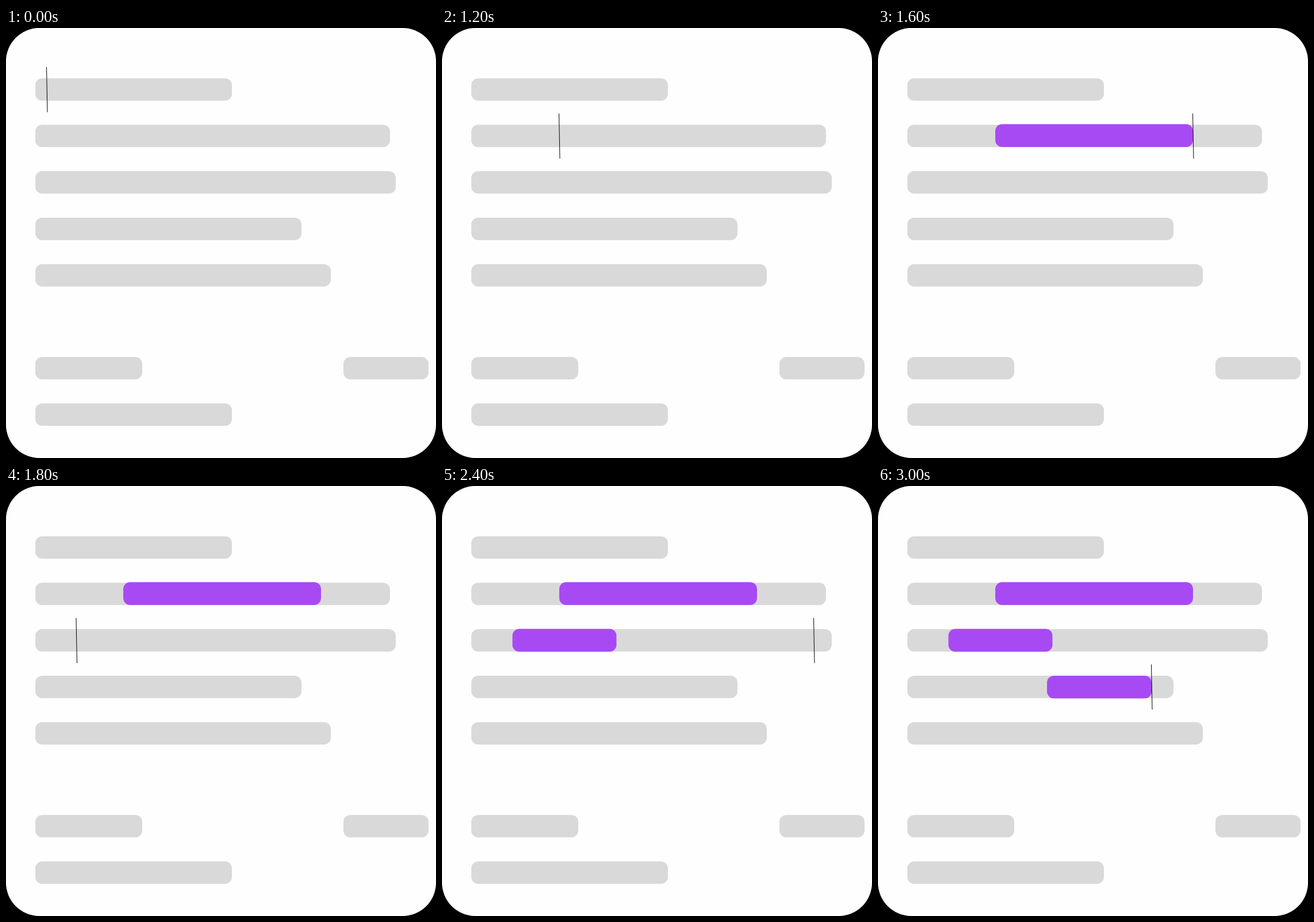
An HTML page with a canvas for the animation above (3200 ms loop, 748 by 748 pixels).

```html
<!DOCTYPE html>
<html lang="en">
<head>
<meta charset="utf-8">
<title>Text selection</title>
<style>
  html, body { margin: 0; width: 100%; height: 100%; overflow: hidden; background: #000; }
  canvas { display: block; }
</style>
</head>
<body>
<canvas id="stage" width="748" height="748"></canvas>
<script>
const ctx = document.getElementById('stage').getContext('2d');
const SIZE = 748, STEP = 200, LEFT = 51, PITCH = 80.8;
const PAPER = '#fefefe', GREY = '#d9d9d9', PURPLE = '#a84af3', INK = '#000';

// Each row: right end of the line, caret stops, and the stops a selection spans
const rows = [
  { right: 393, stops: [70, 120, 170, 237, 338] },
  { right: 668, stops: [98, 203, 380, 547], span: [1, 3] },
  { right: 678, stops: [121.5, 302.5, 424, 646], span: [0, 1] },
  { right: 514, stops: [172, 293, 475], span: [1, 2] },
  { right: 565 },
  {},
  { right: 237 },
  { right: 393 }
];

const total = rows.reduce((n, { stops = [] }) => n + stops.length, 0);

function box(x, y, right, h, r, color) {
  ctx.fillStyle = color;
  ctx.beginPath();
  ctx.roundRect(x, y, right - x, h, r);
  ctx.fill();
}

function line(row, left, right) {
  box(left, 87.5 + row * PITCH, right, 39, 12, GREY);
}

function mark(row, left, right) {
  box(left + 1, 86 + row * 81.3, right + 1, 39.7, 12, PURPLE);
}

function caret(row, x) {
  const y = 68 + row * PITCH;
  ctx.strokeStyle = INK;
  ctx.lineWidth = 1;
  ctx.beginPath();
  ctx.moveTo(x + 0.5, y);
  ctx.lineTo(x + 2, y + 78.5);
  ctx.stroke();
}

function draw(time) {
  let at = Math.floor(time / STEP) % total;
  ctx.fillStyle = '#000';
  ctx.fillRect(0, 0, SIZE, SIZE);
  box(0, 0, SIZE, SIZE, 58, PAPER);
  line(6, 587, 735);
  rows.forEach(({ right, stops = [], span }, row) => {
    if (right) line(row, LEFT, right);
    if (span && at > span[0]) {
      mark(row, stops[span[0]], stops[Math.min(at, span[1])]);
    }
    if (at >= 0 && at < stops.length) caret(row, stops[at]);
    at -= stops.length;
  });
}

const start = performance.now();
function tick() {
  draw(performance.now() - start);
  requestAnimationFrame(tick);
}
tick();
</script>
</body>
</html>
```
